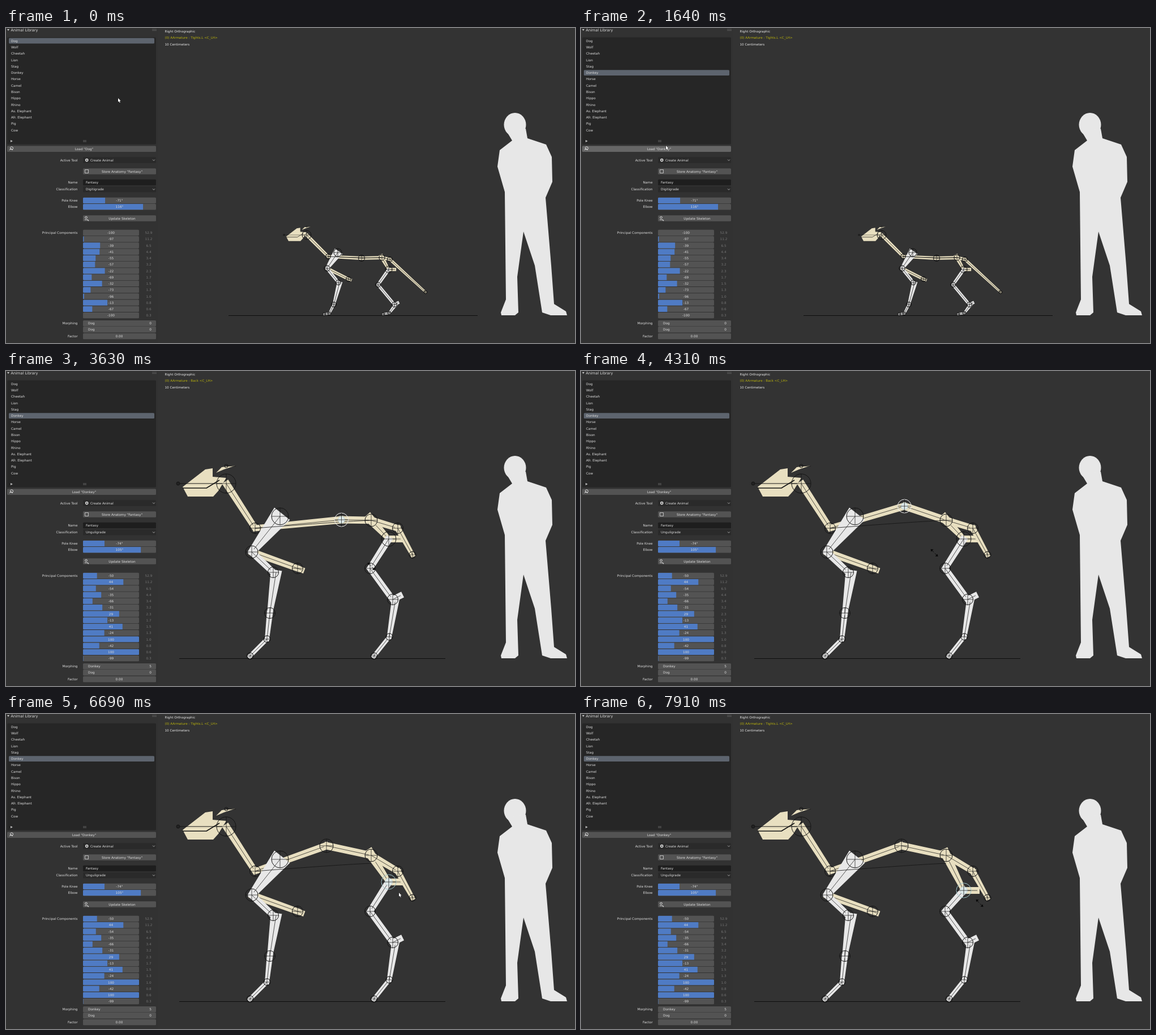
Animation, 1005 px wide and 557 px high, one loop 8 s. Source, as an HTML page with a canvas:

```html
<!DOCTYPE html>
<html lang="en">
<head>
<meta charset="utf-8">
<title>Animal skeleton editor</title>
<style>
html, body { margin: 0; width: 100%; height: 100%; overflow: hidden; background: #333; }
canvas { display: block; }
</style>
</head>
<body>
<canvas id="stage" width="1005" height="557"></canvas>
<script>
const c = document.getElementById('stage').getContext('2d');
const LOOP = 8000, STEP = 110;
const CREAM = '#e8dfc0', WHITE = '#e8e8e8', INK = '#141414', ICON = '#d8d8d8';
const BLUE = '#4f7bc4', BUTTON = '#535353', DARK = '#2a2a2a';

const ANIMALS = ['Dog', 'Wolf', 'Cheetah', 'Lion', 'Stag', 'Donkey', 'Horse', 'Camel', 'Bison', 'Hippo',
  'Rhino', 'As. Elephant', 'Afr. Elephant', 'Pig', 'Cow'];
const WEIGHTS = ['52.9', '11.2', '6.5', '4.4', '3.4', '3.2', '2.3', '1.7', '1.5', '1.3', '1.0', '0.8', '0.6', '0.3'];

const DOG = {
  index: 0, gait: 'Digitigrade', knee: -71, elbow: 116, scale: .47, groundX: 393, groundWidth: 440,
  parts: [-100, -97, -39, -41, -55, -57, -22, -69, -32, -73, -96, -13, -67, -100],
  joints: {
    head: [531, 366], neck: [569, 404], scapula: [586, 397], back: [628, 407], spine: [664, 406],
    rump: [678, 409], tail: [741, 467], hip: [676, 427], knee: [657, 454], hock: [686, 489],
    hindFoot: [677, 504], hindToe: [666, 506], shoulder: [567, 425], elbow: [587, 450],
    wrist: [579, 489], foreFoot: [571, 505], foreToe: [562, 506], sternum: [605, 444]
  }
};
const DONKEY = {
  index: 5, gait: 'Unguligrade', knee: -74, elbow: 105, scale: 1, groundX: 306, groundWidth: 470,
  parts: [-50, 44, -54, -35, -66, -31, 29, -13, 41, -24, 100, -42, 100, -99],
  joints: {
    head: [389, 199], neck: [440, 278], scapula: [484, 257], back: [595, 266], spine: [645, 264],
    rump: [692, 278], tail: [718, 325], hip: [676, 297], knee: [643, 349], hock: [683, 404],
    hindFoot: [677, 470], hindToe: [650, 504], shoulder: [434, 320], elbow: [472, 356],
    wrist: [466, 428], foreFoot: [461, 474], foreToe: [431, 504], sternum: [515, 349]
  }
};

const BACKBONES = ['head neck', 'neck back', 'back spine', 'spine rump', 'rump tail', 'shoulder sternum'];
const LIMBS = ['shoulder elbow', 'wrist foreFoot', 'foreFoot foreToe', 'hip knee', 'knee hock', 'hindFoot hindToe'];
const BIG_RADII = { head: 17, scapula: 15, hip: 13, back: 12, spine: 11, shoulder: 11 };
const radius = name => BIG_RADII[name] || (/Foot|Toe|tail/.test(name) ? 6 : 9.5);
const thickness = name => Math.min(radius(name) + 1.5, 13);

// Motion keys: step, x, y
const CURSOR = [[-1, 198, 124], [7, 28, 81], [10, 27, 80], [14, 150, 208], [16, 150, 208], [18, 657, 364],
  [26, 600, 268], [31, 646, 345], [41, 618, 313], [44, 643, 265], [50, 643, 250], [57, 677, 311],
  [58, 677, 311], [60, 694, 316], [62, 694, 316], [70, 704, 333]];
const BACK = [[30, 595, 266], [41, 566, 233]];
const SPINE = [[44, 645, 264], [50, 645, 250]];
const HIP = [[61, 676, 297], [70, 676, 312]];

function along(keys, step) {
  const next = keys.findIndex(k => k[0] > step);
  if (next === 0) return keys[0].slice(1);
  if (next < 0) return keys[keys.length - 1].slice(1);
  const [s, x, y] = keys[next - 1], [e, x2, y2] = keys[next];
  const u = (step - s) / (e - s), k = u * u * (3 - 2 * u);
  return [x + (x2 - x) * k, y + (y2 - y) * k];
}

function text(str, x, y, { align = 'left', color = '#dcdcdc', size = 5.75 } = {}) {
  c.font = size + 'px "DejaVu Sans", sans-serif';
  c.textAlign = align;
  c.fillStyle = color;
  c.fillText(str, x, y + 2.1);
}

function box(x, y, w, h, color) {
  c.fillStyle = color;
  c.beginPath();
  c.roundRect(x, y, w, h, 1.6);
  c.fill();
}

function poly(points, fill) {
  c.beginPath();
  points.forEach(p => c.lineTo(...p));
  c.closePath();
  c.fillStyle = fill;
  c.fill();
}

function line(points, color = INK, width = .8) {
  c.beginPath();
  points.forEach(p => c.lineTo(...p));
  c.strokeStyle = color;
  c.lineWidth = width;
  c.stroke();
}

function ring(x, y, r, color = INK, width = 1, fill = 'transparent') {
  c.beginPath();
  c.arc(x, y, r, 0, 7);
  c.fillStyle = fill;
  c.fill();
  c.strokeStyle = color;
  c.lineWidth = width;
  c.stroke();
}

const caption = (label, y) => text(label, 126.5, y, { align: 'right' });
const chevron = y => line([[259, y - 1], [261, y + 1], [263, y - 1]], '#c4c4c4');

function slider(y, w, ratio, label) {
  box(136, y - 5.2, w, 10.4, BUTTON);
  c.save();
  c.beginPath();
  c.roundRect(136, y - 5.2, w, 10.4, 1.6);
  c.clip();
  c.fillStyle = BLUE;
  c.fillRect(136, y - 5.2, w * ratio, 10.4);
  c.restore();
  text(label, 136 + w / 2, y, { align: 'center' });
}

function field(y, color, label, x = 141, value = '') {
  box(136, y - 5.3, 129, 10.6, color);
  text(label, x, y);
  text(value, 257, y, { align: 'right' });
}

function button(y, label) {
  box(136, y - 5.3, 129, 10.6, BUTTON);
  text(label, 205, y, { align: 'center' });
}

function drawPanel(animal, selected, hover) {
  c.fillStyle = '#323232';
  c.fillRect(0, 0, 269, 557);
  poly([[2, 2], [6, 2], [4, 5]], '#d0d0d0');
  text('Animal Library', 8.5, 3.4, { size: 6.6 });
  c.fillStyle = '#808080';
  for (let i = 0; i < 8; i++) c.fillRect(258.5 + i % 4 * 2, i < 4 ? 1.7 : 4, 1, 1);

  box(2, 16.5, 263, 189, '#262626');
  box(5, 17.8 + selected * 11.29, 257, 9.8, '#5d646e');
  ANIMALS.forEach((name, i) => text(name, 9, 22.6 + i * 11.29));
  poly([[8, 198], [12, 200], [8, 202]], '#b8b8b8');
  for (const y of [199, 201]) line([[136, y], [142, y]], '#6c6c6c');

  box(2, 208.5, 263, 10.6, hover ? '#666' : BUTTON);
  text(`Load "${ANIMALS[selected]}"`, 138, 213.6, { align: 'center' });
  ring(10, 212.5, 2.6, ICON);
  line([[6, 216], [9, 213], [12, 216]], ICON, 1);

  caption('Active Tool', 233.6);
  field(233.6, DARK, 'Create Animal', 149);
  ring(142.7, 233.6, 2, ICON, 1.6);
  chevron(233.6);
  button(253.5, 'Store Anatomy "Fantasy"');
  c.strokeStyle = ICON;
  c.strokeRect(139.5, 250.5, 6, 6);

  caption('Name', 273);
  field(273, '#1e1e1e', 'Fantasy');
  caption('Classification', 285.3);
  field(285.3, DARK, animal.gait);
  chevron(285.3);

  caption('Pole Knee', 305);
  slider(305, 129, animal.knee / 360 + .5, animal.knee + '°');
  caption('Elbow', 316.3);
  slider(316.3, 129, animal.elbow / 360 + .5, animal.elbow + '°');
  button(336.5, 'Update Skeleton');
  ring(141.5, 335, 1.8, ICON);
  line([[139, 339], [144, 339], [146, 341]], ICON, 1.2);

  caption('Principal Components', 362);
  animal.parts.forEach((value, i) => {
    const y = 362 + i * 11.24;
    slider(y, 99, (value + 100) / 200, String(value));
    text(WEIGHTS[i], 252, y, { align: 'center', color: '#757575' });
  });

  caption('Morphing', 522.2);
  field(522.2, BUTTON, ANIMALS[animal.index], 145, String(animal.index));
  field(533.3, BUTTON, 'Dog', 145, '0');
  caption('Factor', 545);
  button(545, '');
  text('0.00', 200, 545, { align: 'center' });
}

function drawPerson() {
  c.beginPath();
  c.ellipse(899, 171, 19.5, 21, 0, 0, 7);
  c.fillStyle = '#e7e7e7';
  c.fill();
  poly([[885, 184], [894, 199], [872, 216], [868, 245], [881, 290], [883, 480], [874, 503], [875, 508],
    [899, 508], [905, 503], [903, 440], [914, 360], [934, 420], [947, 503], [962, 508], [991, 508],
    [989, 501], [968, 488], [963, 420], [953, 300], [965, 272], [964, 228], [954, 206], [921, 195],
    [918, 178]], '#e7e7e7');
}

// A tapered bar from a to b that reaches a little past both ends.
function drawBone(a, b, w1, w2, color, before, after = before) {
  const len = Math.hypot(b[0] - a[0], b[1] - a[1]);
  const ux = (b[0] - a[0]) / len, uy = (b[1] - a[1]) / len;
  const corner = (p, shift, half) => [p[0] + ux * shift - uy * half, p[1] + uy * shift + ux * half];
  poly([corner(a, -before, w1 / 2), corner(b, after, w2 / 2),
    corner(b, after, -w2 / 2), corner(a, -before, -w1 / 2)], color);
  line([a, b], INK, .7);
}

// Drawn around the head joint at full size.
function drawHead([x, y], scale) {
  c.save();
  c.translate(x, y);
  c.scale(scale, scale);
  poly([[-77, 6], [-37, -25], [-24, -27], [-24, -12], [0, -10], [-14, 13], [-23, 23], [-68, 23]], CREAM);
  poly([[-18, -19], [-8, -29], [17, -32], [-4, -25]], CREAM);
  line([[-77, 8], [-35, 8], [-12, -6]], INK, 1.5);
  line([[-85, 0], [0, 0]], INK, 1);
  line([[0, -31], [17, -31]], INK, 1);
  ring(-85, 0, 3, INK, 1, '#222');
  ring(0, -31, 3);
  c.restore();
}

function drawSkeleton(animal, joints, active) {
  const s = animal.scale, rest = animal.joints;
  const near = (name, dx, dy) => [joints[name][0] + dx * s, joints[name][1] + dy * s];
  const bone = (a, b, w1, w2, color, before = 4, after = 4) =>
    drawBone(a, b, w1 * s, w2 * s, color, before * s, after * s);
  const chain = (pairs, color) => pairs.forEach(pair => {
    const [a, b] = pair.split(' ');
    bone(joints[a], joints[b], thickness(a), thickness(b), color);
  });

  const { groundX, groundWidth } = animal;
  line([[groundX, 508.5], [groundX + groundWidth, 508.5]], '#0e0e0e', 1);
  drawHead(joints.head, s);
  bone(joints.hip, near('hip', 24, 0), 12, 12, CREAM);
  bone(joints.spine, joints.hip, 17, 9, CREAM, 12, 0);
  chain(BACKBONES, CREAM);
  bone(joints.sternum, near('sternum', 8, 3), 10, 10, CREAM, 0);
  bone(joints.scapula, joints.shoulder, 35, 12, WHITE, 6);
  chain(LIMBS, WHITE);
  bone(near('elbow', 5, 0), joints.wrist, 20, 9, WHITE);
  bone(near('hock', 5, 0), joints.hindFoot, 14, 8, WHITE);
  bone(joints.hock, near('hock', 14, -7), 11, 11, WHITE);

  c.beginPath();
  c.moveTo(...rest.neck);
  c.quadraticCurveTo(...rest.back, ...rest.spine);
  c.lineWidth = .8;
  c.stroke();

  for (const name in joints) {
    const [x, y] = joints[name], r = radius(name) * s;
    if (name === active) {
      ring(x, y, r, name === 'hip' ? '#9fc6cb' : '#f0f0f0');
      if (name !== 'spine') ring(x, y, r * .5, '#b8cfd0', .8, '#dfeaea');
    } else {
      ring(x, y, r);
    }
    line([[x - r, y], [x + r, y]], INK, .7);
    line([[x, y - r], [x, y + r]], INK, .7);
  }
}

function drawCursor([x, y], dragging) {
  c.save();
  c.translate(x, y);
  if (dragging) {
    for (const side of [-1, 1]) {
      const at = (dx, dy) => [dx * side, dy * side + 1.5];
      poly([at(6.5, 6.5), at(1.5, 6), at(5.5, 2)], '#080808');
      line([at(1, 1), at(4, 4)], '#080808', 1);
    }
  } else {
    const arrow = [[0, 0], [0, 6.8], [1.5, 5.5], [2.6, 8], [3.8, 7.4], [2.8, 5.1], [4.8, 5]];
    line([...arrow, arrow[0]], '#111', 1);
    poly(arrow, '#fff');
  }
  c.restore();
}

function draw(time) {
  const step = Math.floor((time - 80) / STEP);
  const loaded = step >= 17;
  const animal = loaded ? DONKEY : DOG;
  const joints = loaded
    ? { ...DONKEY.joints, back: along(BACK, step), spine: along(SPINE, step), hip: along(HIP, step) }
    : DOG.joints;
  const active = step < 26 ? '' : step < 43 ? 'back' : step < 55 ? 'spine' : 'hip';
  const activeName = { back: 'Back', spine: 'Spine' }[active] || 'Tights.L';
  const dragging = [BACK, SPINE, HIP].some(([from, to]) => step > from[0] && step <= to[0] + 1);

  c.fillStyle = '#333';
  c.fillRect(0, 0, 1005, 557);
  drawPanel(animal, step >= 10 ? 5 : 0, step >= 14 && !loaded);
  text('Right Orthographic', 280.5, 6, { color: '#e8e8e8', size: 5.65 });
  text(`(0) AArmature : ${activeName} <C_LH>`, 280.5, 17, { color: '#b9b20c', size: 5.65 });
  text('10 Centimeters', 280.5, 28.4, { color: '#e8e8e8', size: 5.65 });
  drawPerson();
  drawSkeleton(animal, joints, active);
  drawCursor(along(CURSOR, step), dragging);
}

c.textRendering = 'geometricPrecision';
c.lineJoin = 'round';
const start = performance.now();
function tick() {
  draw((performance.now() - start) % LOOP);
  requestAnimationFrame(tick);
}
tick();
</script>
</body>
</html>
```
